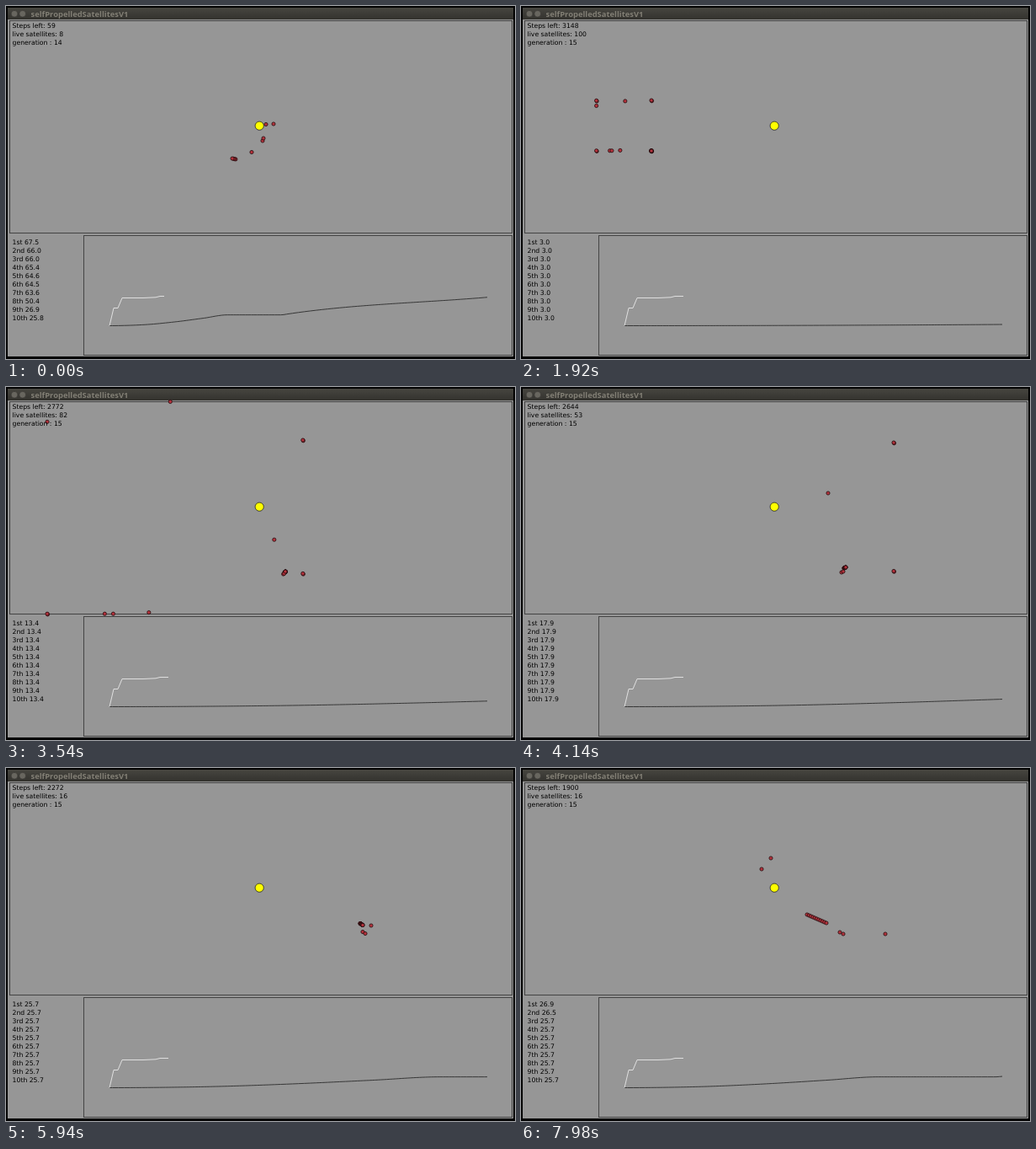
Recreate the animation shown at these times as an HTML page. Size 605 by 419 pixels, loop 8000 ms.

```html
<!DOCTYPE html>
<html lang="en">
<head>
<meta charset="utf-8">
<title>selfPropelledSatellitesV1</title>
<style>
html, body { margin: 0; width: 100%; height: 100%; overflow: hidden; background: #000; }
svg { display: block; width: 605px; height: 419px; }
text { font: 7.7px "DejaVu Sans", sans-serif; fill: #000; white-space: pre; }
.title { font: bold 9.4px "Open Sans", sans-serif; fill: #827f75; }
.frame { fill: none; stroke: #444; shape-rendering: crispEdges; }
.line { fill: none; stroke-width: .9; }
#sats circle { fill: #b5323c; stroke: #240c0e; stroke-width: .8; }
</style>
</head>
<body>
<svg viewBox="0 0 605 419">
  <defs>
    <linearGradient id="bar" x2="0" y2="1">
      <stop stop-color="#474640"/><stop offset="1" stop-color="#33322e"/>
    </linearGradient>
  </defs>
  <rect width="605" height="419" fill="#000"/>
  <rect x="2" y="2" width="601" height="14" fill="url(#bar)"/>
  <g fill="#68665f" stroke="#33322e" stroke-width=".6"><circle cx="10" cy="9.2" r="3.9"/><circle cx="19.7" cy="9.2" r="3.9"/></g>
  <text class="title" x="29.5" y="12.5">selfPropelledSatellitesV1</text>
  <rect x="2" y="16" width="601" height="400" fill="#969696"/>
  <rect class="frame" x="4.5" y="17.5" width="597" height="252"/>
  <rect class="frame" x="92.5" y="272.5" width="509" height="142"/>
  <circle cx="301.2" cy="142.2" r="5.1" fill="#ff0" stroke="#222" stroke-width=".8"/>
  <g id="sats"></g>
  <polyline id="best" class="line" stroke="#2c2c2c"/>
  <polyline id="history" class="line" stroke="#e8e8e8"/>
  <g id="labels"></g>
</svg>
<script>
const LOOP = 8000, TICK = 60, RESET = 660, TOTAL = 3500;
const HOME = { x: 102, y: 142 };
const $ = id => document.getElementById(id);
const mix = (a, b, u) => a + (b - a) * u;

function add(parent, tag, attrs) {
  const el = document.createElementNS("http://www.w3.org/2000/svg", tag);
  for (const k in attrs) el.setAttribute(k, attrs[k]);
  return parent.appendChild(el);
}

// Smooth curve through (xs, ys); flat stretches stay flat.
function curve(xs, ys, x, fromRest) {
  const last = ys.length - 1;
  if (x <= xs[0]) return ys[0];
  if (x >= xs[last]) return ys[last];
  let i = 0;
  while (x > xs[i + 1]) i++;
  const width = j => xs[j + 1] - xs[j];
  const slope = j => (ys[j + 1] - ys[j]) / width(j);
  const tangent = j => {
    if (j === 0) return fromRest ? 0 : slope(0);
    if (j === last) return slope(last - 1);
    const a = slope(j - 1), b = slope(j);
    if (!a || !b) return 0;
    return (a * width(j) + b * width(j - 1)) / (width(j) + width(j - 1));
  };
  const h = width(i), u = (x - xs[i]) / h, v = 1 - u;
  return v * v * (1 + 2 * u) * ys[i] + u * u * (3 - 2 * u) * ys[i + 1]
    + h * u * v * (v * tangent(i) - u * tangent(i + 1));
}

// Steps done after a number of ticks; the run slows down as it goes on.
const ticks = [0, 9, 21, 38, 58, 88, 122];
const steps = [0, 152, 352, 592, 856, 1228, 1600];
const elapsed = ms => Math.round(curve(ticks, steps, (ms - RESET) / TICK) / 4) * 4;

// Best score: a steady climb, a plateau, then a long rise.
const bestScore = t => curve([0, 152, 352, 592, 856, 1075, 1570, 1600, 3441],
  [0, .6, 3, 9, 17.9, 25.7, 25.7, 26.9, 67.5], t, true);

const crafts = [];

// Constant thrust from home: ax and ay in pixels per (100 steps) squared.
function thrust(n, ax, ay) {
  crafts.push({ n, at: t => {
    const q = t * t / 1e4;
    return [HOME.x + ax * q, HOME.y + ay * q];
  } });
}
thrust(18, -1, -2.4);
thrust(4, 1.76, -2.35);
thrust(2, -1, -1.9);
thrust(14, -1, 2.4);
thrust(3, .29, 2.4);
thrust(4, .48, 2.4);
thrust(2, 1.28, 2.37);

// Shared launch towards the sun, then a tail of key points; side -1 mirrors the path upwards.
const launch = [[102, 142], [112, 148], [155, 172], [265, 216]];
function swing(n, side, ...tail) {
  const points = [...launch, ...tail];
  const xs = points.map(p => p[0]), ys = points.map(p => HOME.y + side * (p[1] - HOME.y));
  crafts.push({ n, at: t => [curve(steps, xs, t, true), curve(steps, ys, t, true)] });
}
swing(17, -1, [443, 218], [700, 194]);
swing(17, 1, [443, 218.5], [700, 190]);
swing(3, 1, [365, 126], [480, -75]);

// Survivors swing round and fall back, stretched between two end points.
function pack(n, mid, turn, from, to) {
  for (let i = 0; i < n; i++) {
    const u = n > 1 ? i / (n - 1) : 0;
    swing(1, 1, [mid[0] + 2 * u, mid[1] - u], [turn[0] + 3 * u, turn[1] + 2 * u],
      [mix(from[0], to[0], u), mix(from[1], to[1], u)]);
  }
}
pack(2, [384, 215], [421, 184.5], [286, 120], [297, 107]);
pack(11, [384, 215], [421, 184.5], [340, 174], [363, 184]);
pack(2, [381, 220], [424, 194.5], [379, 195], [383, 197]);
pack(1, [386, 214], [434, 187], [433, 197]  , [433, 197]);

// Last moments of the previous generation.
const veterans = [[292, 173.5], [305, 160], [306, 157], [309, 140.5], [318, 140]];
for (let i = 0; i < 4; i++) veterans.unshift([269 + 1.3 * i, 181 + .3 * i]);
const oldScores = [67.5, 66, 66, 65.4, 64.6, 64.5, 63.6, 50.4, 26.9, 25.8];

const inside = ([x, y]) => x > 4 && x < 601 && y > 17 && y < 270;

function swarm(t) {
  const list = [];
  let live = 0;
  for (const { n, at } of crafts) {
    const p = at(t);
    if (!inside(p)) continue;
    live += n;
    if (n > 10) list.push([p[0] + .5, p[1] + .7]);
    list.push(p);
  }
  return { list, live };
}

const label = y => add($("labels"), "text", { x: 7.6, y });
const info = [26, 36, 46].map(label);
const ranks = oldScores.map((_, i) => label(283.4 + 10 * i));
const ordinal = n => n + (["", "st", "nd", "rd"][n] || "th");
const dots = Array.from({ length: 40 }, () => add($("sats"), "circle", { r: 2.1 }));

function drawGraph(t) {
  const pts = [];
  for (let u = 0; u <= 1; u += 1 / 128) {
    pts.push((123 + 449 * u).toFixed(1) + "," + (379.5 - bestScore(t * u) / 2).toFixed(2));
  }
  $("best").setAttribute("points", pts.join(" "));
}

function draw(ms) {
  const now = Math.floor(ms / TICK) * TICK;
  const old = now < RESET;
  const left = old ? Math.round(59 * (1 - now / RESET)) : TOTAL - elapsed(now);
  const t = TOTAL - left, best = bestScore(t), drift = 59 - left;
  const { list, live } = old
    ? { list: veterans.map(([x, y]) => [x + .15 * drift, y - .15 * drift]), live: 8 }
    : swarm(t);

  dots.forEach((dot, i) => {
    const p = list[i];
    dot.setAttribute("visibility", p ? "visible" : "hidden");
    if (!p) return;
    dot.setAttribute("cx", p[0].toFixed(2));
    dot.setAttribute("cy", p[1].toFixed(2));
  });

  info[0].textContent = "Steps left: " + left;
  info[1].textContent = "live satellites: " + live;
  info[2].textContent = "generation : " + (old ? 14 : 15);
  ranks.forEach((el, i) => {
    const floor = Math.min(best, 25.7);
    const score = old ? oldScores[i] : i < 2 ? Math.max(floor, best - .4 * i) : floor;
    el.textContent = ordinal(i + 1) + " " + score.toFixed(1);
  });
  drawGraph(t);
  $("history").setAttribute("points",
    "123,379.5 128,358.5 133,358.5 138,346.5 163,346.5 178,345.8 183,344.5 188,344.5" + (old ? "" : " 193,344.5"));
}

const start = performance.now();
function loop() {
  draw((performance.now() - start) % LOOP);
  requestAnimationFrame(loop);
}
draw(0);
loop();
</script>
</body>
</html>
```
